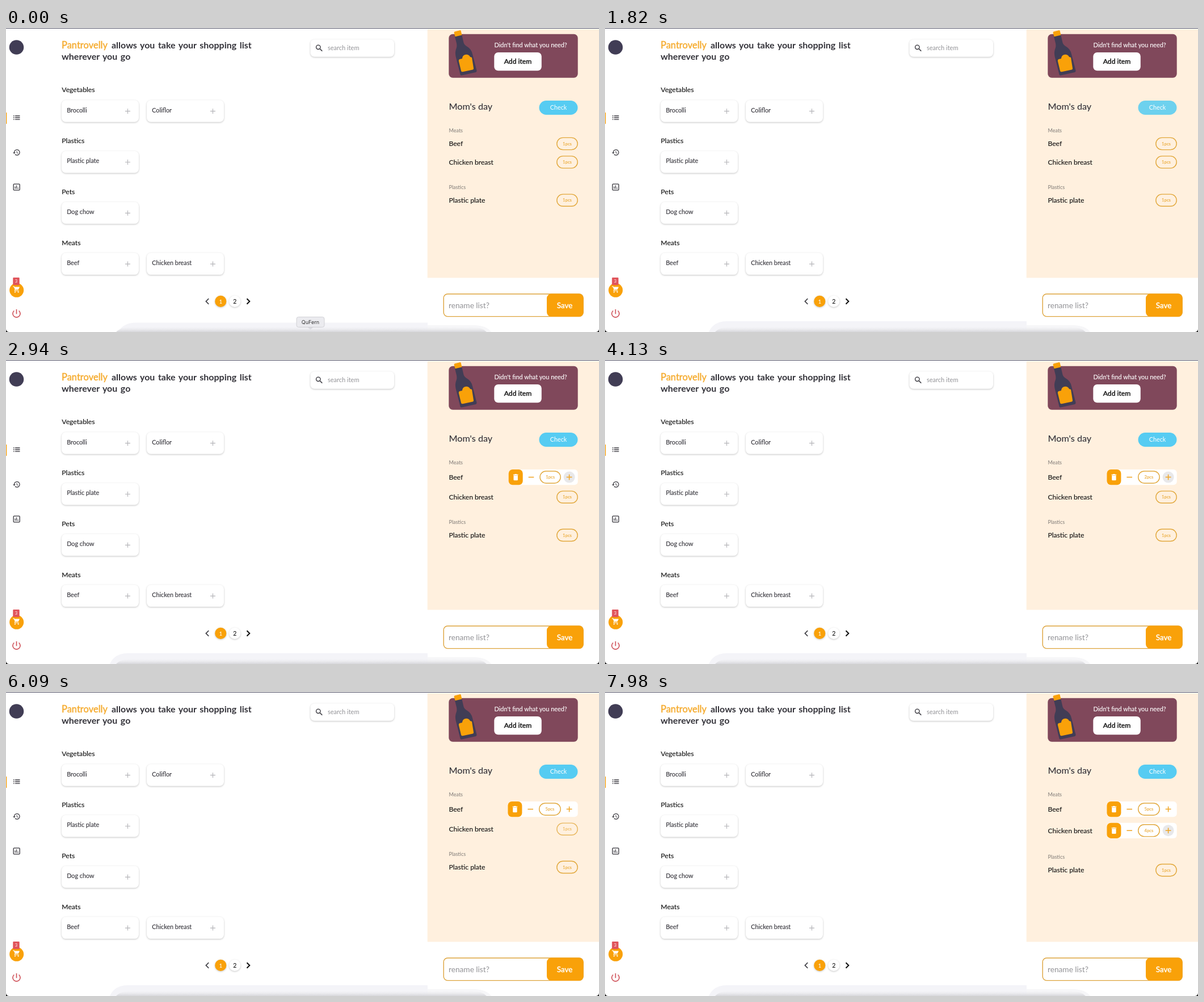
Animation, 1045 px wide and 536 px high, one loop 8000 ms. Source, as an HTML page:

```html
<!DOCTYPE html>
<html lang="en">
<head>
<meta charset="utf-8">
<title>Shopping list</title>
<style>
html, body { margin: 0; width: 100%; height: 100%; overflow: hidden; background: #fff; }
svg { display: block; width: 100%; height: 100%; }
text { font-family: Lato, "Open Sans", sans-serif; white-space: pre; }
.medium { stroke: currentColor; stroke-width: .12px; }
.semi { stroke: currentColor; stroke-width: .4px; }
.raised { filter: drop-shadow(0 1px 1.6px rgba(0, 0, 0, .23)); }
</style>
</head>
<body>
<svg id="stage" viewBox="0 0 1045 536" xmlns="http://www.w3.org/2000/svg">
  <defs>
    <linearGradient id="dockShade" x1="0" y1="0" x2="0" y2="1">
      <stop offset="0" stop-color="#e9e9ec" stop-opacity="0"/>
      <stop offset="1" stop-color="#d6d6da"/>
    </linearGradient>
  </defs>
  <g id="page"></g>
  <g id="list"></g>
  <g id="dock">
    <path id="dockBack" fill="#f4f4f8"/>
    <path d="M743 536V524H826Q848 525 855 536Z" fill="#f6f6f8"/>
    <path d="M194 536Q202 527 222 527H822Q840 528 847 536Z" fill="url(#dockShade)"/>
  </g>
  <g id="tip">
    <path d="M531 527L536.5 532L542 527Z" fill="#dcdce1"/>
    <rect x="512" y="509.5" width="49" height="18" rx="3.5" fill="#ebebef" stroke="#c9c9ce" stroke-width=".8"/>
    <text x="536.5" y="521.6" text-anchor="middle" font-size="9" fill="#333" style="font-family:Inter,sans-serif">QuFern</text>
  </g>
  <path d="M0 .5H1045" stroke="#55556a" stroke-width="1.2"/>
  <path d="M0 536V531Q.5 535.5 5 536ZM1045 536V531Q1044.500 535.5 1040 536Z" fill="#111"/>
</svg>
<script>
const LOOP = 8000;
const ORANGE = '#f9a109', INK = '#34333a';
const $ = id => document.getElementById(id);

const ICONS = {
  search: 'M15.500 14h-.79l-.28-.27A6.470 6.470 0 0 0 16 9.500 6.500 6.500 0 1 0 9.500 16c1.610 0 3.090-.59 4.230-1.570l.27.28v.79l5 4.990L20.490 19l-4.990-5zm-6 0a4.500 4.500 0 1 1 0-9 4.500 4.500 0 0 1 0 9z',
  history: 'M13 3a9 9 0 0 0-9 9H1l4 4 4-4H6a7 7 0 1 1 2.060 4.940l-1.420 1.420A9 9 0 1 0 13 3zm-1 5v5l4.280 2.540.72-1.210-3.500-2.080V8z',
  cart: 'M7 18a2 2 0 1 0 0 4a2 2 0 1 0 0-4zM1 2v2h2l3.600 7.590-1.350 2.450A2 2 0 0 0 7 17h12v-2H7.420q-.4-.1-.22-.37l.9-1.630h7.450q1.150 0 1.750-1.030l3.580-6.490A1 1 0 0 0 20 4H5.210l-.94-2zm16 16a2 2 0 1 0 0 4a2 2 0 1 0 0-4z',
  power: 'M13 3h-2v10h2zm4.830 2.170l-1.420 1.420A7 7 0 1 1 7.580 6.580L6.170 5.170A9 9 0 1 0 17.830 5.170z',
  trash: 'M6 19a2 2 0 0 0 2 2h8a2 2 0 0 0 2-2V7H6zM19 4h-3.500l-1-1h-5l-1 1H5v2h14z'
};

const icon = (name, x, y, scale, fill) =>
  `<path d="${ICONS[name]}" fill="${fill}" transform="translate(${x - 12 * scale} ${y - 12 * scale}) scale(${scale})"/>`;
const rect = (x, y, w, h, r, fill, more = '') =>
  `<rect x="${x}" y="${y}" width="${w}" height="${h}" rx="${r}" fill="${fill}" ${more}/>`;
const circle = (x, y, r, fill, more = '') =>
  `<circle cx="${x}" cy="${y}" r="${r}" fill="${fill}" ${more}/>`;
const line = (d, color, width) =>
  `<path d="${d}" fill="none" stroke="${color}" stroke-width="${width}"/>`;
const plus = (x, y, r, color, width) =>
  line(`M${x - r} ${y}H${x + r}M${x} ${y - r}V${y + r}`, color, width);
const text = (x, y, str, size, fill = INK, more = '') =>
  `<text x="${x}" y="${y}" font-size="${size}" fill="${fill}" color="${fill}" ${more}>${str}</text>`;
const MEDIUM = 'class="medium"', SEMI = 'class="semi"', BOLD = 'font-weight="700"';
const MID = 'text-anchor="middle"', RAISED = 'class="raised"';

function sidebar() {
  const rows = [155, 158.2, 161.400];
  return circle(18.5, 34, 12.8, '#413d55')
    + rect(0, 149, 1.3, 20, .5, ORANGE)
    + rows.map(y => line(`M13 ${y}h1.700M16 ${y}h8.500`, INK, 1.4)).join('')
    + icon('history', 18.7, 219.4, .6, INK)
    + rect(13.2, 275.2, 11, 10.6, 1.2, 'none', `stroke="${INK}" stroke-width="1.3"`)
    + line('M16.200 279.5V283.500M18.700 277.500V283.500M21.200 281.500V283.500', INK, 1.2)
    + circle(18.7, 462.3, 12.5, ORANGE)
    + icon('cart', 18.8, 461, .57, '#fff')
    + rect(12.3, 440, 11.4, 13.2, 1, '#e0535a')
    + text(18, 449.3, '3', 7.5, '#fff', MID)
    + icon('power', 18.5, 503.5, .82, '#cf5058');
}

function card(x, y, name) {
  return rect(x, y, 136, 38.5, 7.5, '#fff', RAISED)
    + text(x + 9.2, y + 21.4, name, 10.8, INK, MEDIUM)
    + plus(x + 116.5, y + 19.5, 4.5, '#b5b5b9', 1.2);
}

function catalog() {
  const groups = [
    ['Vegetables', 'Brocolli', 'Coliflor'],
    ['Plastics', 'Plastic plate'],
    ['Pets', 'Dog chow'],
    ['Meats', 'Beef', 'Chicken breast']
  ];
  const title = BOLD + ' word-spacing="1.6"';
  return text(98, 36.4, 'Pantrovelly', 16.5, '#f5ab2e', SEMI)
    + text(186, 36.4, 'allows you take your shopping list', 16, INK, title)
    + text(98, 56.2, 'wherever you go', 16, INK, title)
    + rect(536.5, 20.3, 147.500, 30.5, 7, '#fff', RAISED)
    + icon('search', 552, 35.5, .68, INK)
    + text(567, 39.4, 'search item', 11, '#929296')
    + groups.map(([head, ...names], i) => {
      const y = 127.2 + i * 89.8;
      return text(98.3, y - 13.8, head, 12.2, '#111', MEDIUM)
        + names.map((name, j) => card(98 + j * 150, y, name)).join('');
    }).join('')
    + line('M357.200 477.200L352.400 482L357.200 486.800', '#4a4a4f', 1.8)
    + circle(378.3, 481.9, 10.1, ORANGE, RAISED)
    + text(378.3, 485.6, '1', 10, '#fff', MID)
    + circle(403.2, 481.9, 10.1, '#fff', RAISED)
    + text(403.2, 485.8, '2', 10.5, '#111', `${MID} ${MEDIUM}`)
    + line('M424.500 477.200L429.300 482L424.500 486.800', '#111', 2);
}

function panel() {
  return rect(742.7, 2, 302.3, 438.5, 0, '#fff0de')
    + rect(780.3, 10.7, 227.4, 77, 7, '#80485b')
    + `<path d="M790.500 13L803 10.500L806 24Q807 30 813 33Q820 37 822 46L829.500 75Q830 77 828 78L803 83.500Q801 84 800.500 82L792.500 50Q791 42 793.500 36Q795 33 794 27Z" fill="#413d55"/>`
    + `<path d="M789.600 8.500Q789.300 6.600 791 6.200L799.500 4.200Q801.300 3.800 801.800 5.500L803.400 12.500L791.500 15.200Z" fill="${ORANGE}"/>`
    + `<path d="M797.800 58Q797.700 55.500 799.500 55L803.800 54Q804.500 48 809.500 47Q815 46 818 51L821 52L824 71Q824.300 73 822.500 73.500L805 77.300Q802.500 77.700 802 75.500Z" fill="${ORANGE}"/>`
    + text(860.5, 34.3, "Didn't find what you need?", 10.9, '#fff', MEDIUM)
    + rect(860.3, 43, 83.5, 32.3, 7, '#fff')
    + text(902, 63.4, 'Add item', 12.2, '#111', `${MID} ${SEMI}`)
    + text(780.5, 143.6, "Mom's day", 16.2, INK, MEDIUM)
    + rect(771.2, 469, 246, 39.6, 7, '#fff', 'stroke="#dda43c" stroke-width="1.4"')
    + text(780, 493.6, 'rename list?', 13.7, '#929296')
    + rect(953, 468.6, 64.500, 40.4, 8, ORANGE)
    + text(984.5, 493.6, 'Save', 13.4, '#fff', `${MID} ${SEMI}`);
}

function pill(x, y, w, count, hover) {
  return `<g opacity="${hover ? .8 : 1}">`
    + rect(x, y - 10.6, w, 21.2, 10.6, 'none', 'stroke="#e2a83c" stroke-width="1.4"')
    + text(x + w / 2, y + 2.7, count + 'pcs', 7.7, '#eaa935', `${MID} ${MEDIUM}`) + '</g>';
}

const rowHeight = item => item.open ? 27.2 : 22;

function row(y, name, item) {
  const h = rowHeight(item), mid = y + h / 2;
  const label = text(780.5, mid + 4.2, name, 12.1, '#111', MEDIUM);
  if (!item.open) return label + pill(970.8, mid, 36.4, item.count, item.hover);
  const shift = item.count > 1 ? 1.3 : 0;
  const left = 885.7 - shift;
  return label
    + rect(left, y, 1007.7 - left, h, 6, '#fff')
    + rect(left, y, 25, h, 7, ORANGE)
    + icon('trash', left + 12.500, mid, .62, '#fff')
    + line(`M${left + 35} ${mid}h9.600`, '#f0a11d', 1.5)
    + pill(941 - shift, mid, 36.2 + shift, item.count)
    + (item.hover ? circle(992.6, mid, 10, '#e8e8ea') : '')
    + plus(992.6, mid, 4.9, '#efa524', 1.5);
}

function shoppingList(s) {
  const small = (y, str) => text(780.5, y, str, 9, '#7f7a76');
  const second = 193 + rowHeight(s.beef) + 10.5;
  const end = second + rowHeight(s.chicken);
  return rect(939.5, 128, 68, 25, 12.5, '#56ccf2', `opacity="${s.check ? .86 : 1}"`)
    + text(973.5, 144.2, 'Check', 10.8, '#fff', MID)
    + small(184, 'Meats')
    + row(193, 'Beef', s.beef)
    + row(second, 'Chicken breast', s.chicken)
    + small(end + 36.2, 'Plastics')
    + row(end + 45.2, 'Plastic plate', { count: 1 });
}

const within = (t, ...spans) => spans.some(([a, b]) => t >= a && t < b);
const counter = (t, ...clicks) => 1 + clicks.filter(c => t >= c).length;
const progress = (t, from, to) => Math.min(1, Math.max(0, (t - from) / (to - from)));

const stateAt = t => ({
  check: within(t, [1820, 2100]),
  beef: {
    open: t >= 2940,
    hover: within(t, [2590, 3290], [3570, 5390]),
    count: counter(t, 4130, 4410, 4690, 4970)
  },
  chicken: {
    open: t >= 6300,
    hover: within(t, [6090, 6930], [7140, LOOP]),
    count: counter(t, 7490, 7700, 7980)
  }
});

let shown = '';
function draw(t) {
  const state = stateAt(t), key = JSON.stringify(state);
  if (key !== shown) {
    $('list').innerHTML = shoppingList(state);
    shown = key;
  }
  const grow = progress(t, 70, 280);
  const left = 198 - 15 * grow, top = 519.5 - 2.5 * grow;
  $('dockBack').setAttribute('d', `M${left} 536Q${left + 8} ${top} ${left + 32} ${top}H743V536Z`);
  $('tip').setAttribute('opacity', 1 - progress(t, 350, 630));
}

$('page').innerHTML = sidebar() + catalog() + panel();
const start = performance.now();
function tick() {
  draw((performance.now() - start) % LOOP);
  requestAnimationFrame(tick);
}
tick();
</script>
</body>
</html>
```
